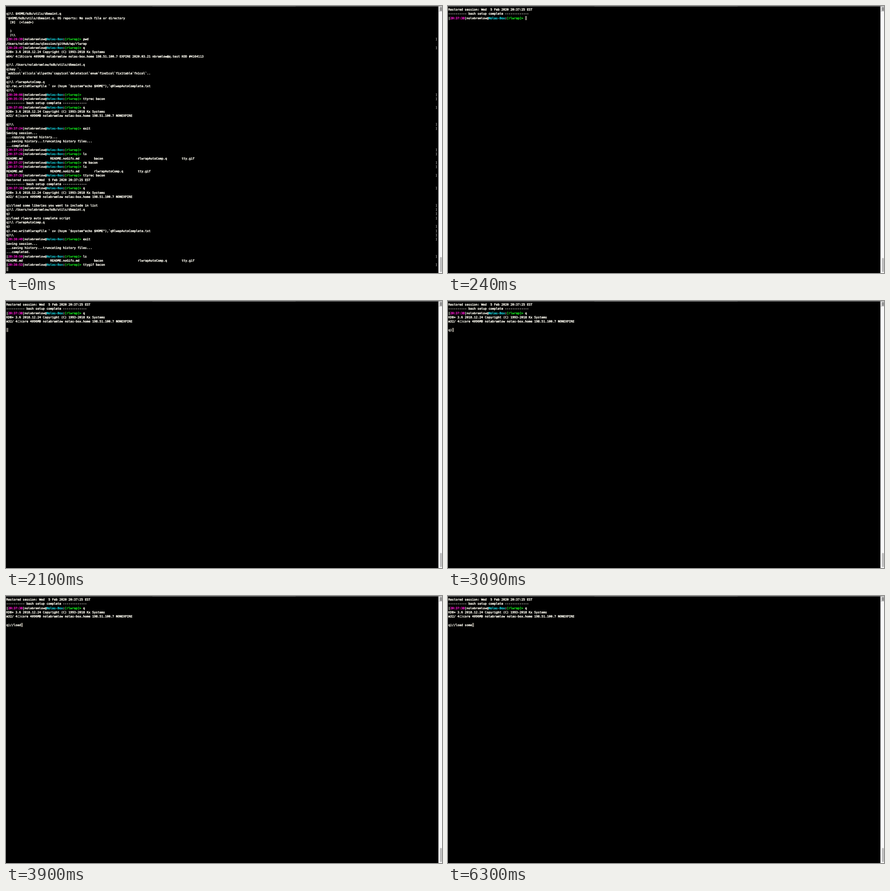
Write an HTML page with a canvas that moves like this. It is 956 by 586 pixels and loops after 8000 ms.

```html
<!DOCTYPE html>
<html lang="en">
<head>
<meta charset="utf-8">
<title>Terminal session</title>
<style>
  html, body { margin: 0; height: 100%; overflow: hidden; background: #000; }
  canvas { display: block; }
</style>
</head>
<body>
<canvas id="screen" width="956" height="586"></canvas>
<!-- "@time command" is a shell prompt; a leading "]" puts a mark at the right edge. -->
<script type="text/plain" id="log">

q)\l $HOME/kdb/utils/dbmaint.q
'$HOME/kdb/utils/dbmaint.q. OS reports: No such file or directory
  [0]  (<load>)

  )
  )\\
@20:28:39 pwd
/Users/nolabramlow/qSession/gitHub/wp/rlwrap
@20:28:47 q
KDB+ 3.6 2018.12.24 Copyright (C) 1993-2018 Kx Systems
m64/ 4(16)core 4096MB nolabramlow nolas-box.home 198.51.100.7 EXPIRE 2020.03.21 nbramlow@q.test KOD #4164113

q)\l /Users/nolabramlow/kdb/utils/dbmaint.q
q)key `.
`add1col`allcols`allpaths`copy1col`delete1col`enum`find1col`fix1table`fn1col`..
q)
q)\l rlwrapAutoComp.q
q).rac.writeRlwrapFile ` sv (hsym `$system"echo $HOME"),`qRlwapAutoComplete.txt
q)\\
@20:30:08
@20:35:35 ttyrec bacon
---------- bash setup complete -------------
@20:37:05 q
KDB+ 3.6 2018.12.24 Copyright (C) 1993-2018 Kx Systems
m32/ 4()core 4096MB nolabramlow nolas-box.home 198.51.100.7 NONEXPIRE

]q)\\
@20:37:24 exit
Saving session...
...copying shared history...
...saving history...truncating history files...
...completed.
@20:37:25
@20:37:26 ls
README.md               README.noGifs.md        bacon                   rlwrapAutoComp.q        tty.gif
@20:37:27 rm bacon
@20:37:30 ls
README.md               README.noGifs.md        rlwrapAutoComp.q        tty.gif
@20:37:32 ttyrec bacon
Restored session: Wed  5 Feb 2020 20:37:25 EST
---------- bash setup complete -------------
@20:37:38 q
KDB+ 3.6 2018.12.24 Copyright (C) 1993-2018 Kx Systems
m32/ 4()core 4096MB nolabramlow nolas-box.home 198.51.100.7 NONEXPIRE

]q)//load some libaries you want to include in list
]q)\l /Users/nolabramlow/kdb/utils/dbmaint.q
]q)
]q)/load rlwarp auto complete script
q)\l rlwrapAutoComp.q
]q)
]q).rac.writeRlwrapFile ` sv (hsym `$system"echo $HOME"),`qRlwapAutoComplete.txt
]q)\\
@20:38:49 exit
Saving session...
...saving history...truncating history files...
...completed.
@20:38:50 ls
README.md               README.noGifs.md        bacon                   rlwrapAutoComp.q        tty.gif
@20:38:53 ttygif bacon
</script>
<script>
const ctx = document.getElementById('screen').getContext('2d');
const log = document.getElementById('log').textContent.split('\n').slice(1, -1);
const session = log.slice(40, 46);
const typed = log[46].slice(1);

const LOOP = 8000, LEFT = 0.8, TOP = 3, CELL = 4.004, ROW = 9.34;
const WHITE = '#fffdf2', PINK = '#ff18d4', CYAN = '#16ced8', GREEN = '#14e61e', GRAY = '#8c8c8c';

// [time, characters visible on the q) line]
const keys = [[3090, 2], [3200, 3], [3440, 4], [3620, 6], [3780, 7], [3900, 8],
              [5860, 9], [6050, 11], [6130, 12], [6300, 13]];

function rect(color, x, y, w, h) {
  ctx.fillStyle = color;
  ctx.fillRect(x, y, w, h);
}

function write(text, col, row, color = WHITE, bold = false) {
  ctx.save();
  // A large font scaled down keeps the advances fractional.
  ctx.translate(LEFT + col * CELL, TOP + row * ROW + 6.9);
  ctx.scale(0.1, 0.1);
  ctx.font = `${bold ? 'bold ' : ''}66.5px "DejaVu Sans Mono", monospace`;
  ctx.textRendering = 'geometricPrecision';
  ctx.fillStyle = ctx.strokeStyle = color;
  ctx.lineWidth = bold ? 2 : 4.5;
  ctx.lineJoin = 'round';
  ctx.strokeText(text, 0, 0);
  ctx.fillText(text, 0, 0);
  ctx.restore();
}

function cursor(col, row) {
  rect('#77736b', Math.round(1 + col * 4), Math.round(TOP + row * ROW), 4, 9);
}

function prompt(time, command, row, bold) {
  write('|', 0, row);
  write(time, 1, row, PINK, bold);
  write('|', 9, row);
  write('nolabramlow@', 10, row, WHITE, true);
  write('Nolas-Box', 22, row, CYAN, bold);
  write(':', 31, row);
  write('[rlwrap]>', 32, row, GREEN, bold);
  write(command, 42, row);
}

function line(text, row, history) {
  const marked = /^[@\]]/.test(text);
  if (text[0] === '@') prompt(text.slice(1, 9), text.slice(10), row, history);
  else write(marked ? text.slice(1) : text, 0, row);
  if (marked && history) write(']', 235, row, GRAY);
}

function frame(thumbTop) {
  rect('#000', 0, 0, 956, 586);
  rect('#8e8e8e', 0, 0, 956, 1);
  rect('#a8a8a8', 321, 0, 314, 1);
  rect('#fafafa', 949, 1, 7, 585);
  rect('#c8c8c8', 948, 1, 1, 585);
  rect('#e4e4e4', 949, 1, 7, 10);
  rect('#b0b0b0', 949, 11, 7, 1);
  for (let y = 3; y < 10; y += 2) rect('#4a4a4a', 951, y, 5, 1);
  ctx.fillStyle = '#c1c1c1';
  ctx.beginPath();
  ctx.roundRect(951, thumbTop, 5, 584 - thumbTop, 2);
  ctx.fill();
}

function replay(t) {
  line(session[0], 0);
  if (t >= 140) line(session[1], 1);
  if (t >= 240) line(t < 2010 ? session[2].slice(0, 9) : session[2], 2);
  if (t >= 2100) for (const row of [3, 4]) line(session[row], row);

  if (t >= 3090) {
    const count = keys.filter(([at]) => t >= at).pop()[1];
    cursor(count, 6);
    write(typed.slice(0, count), 0, 6);
  } else if (t >= 2100) cursor(0, 6);
  else if (t >= 2060) cursor(0, 3);
  else if (t >= 240) cursor(t < 2010 ? 42 : 43, 2);
}

function draw() {
  const t = performance.now() % LOOP;
  frame(t < 40 ? 551 : 553);
  if (t < 40) {
    log.forEach((text, row) => line(text, row, true));
    cursor(0, 61);
  } else replay(t);
  requestAnimationFrame(draw);
}
draw();
</script>
</body>
</html>
```
